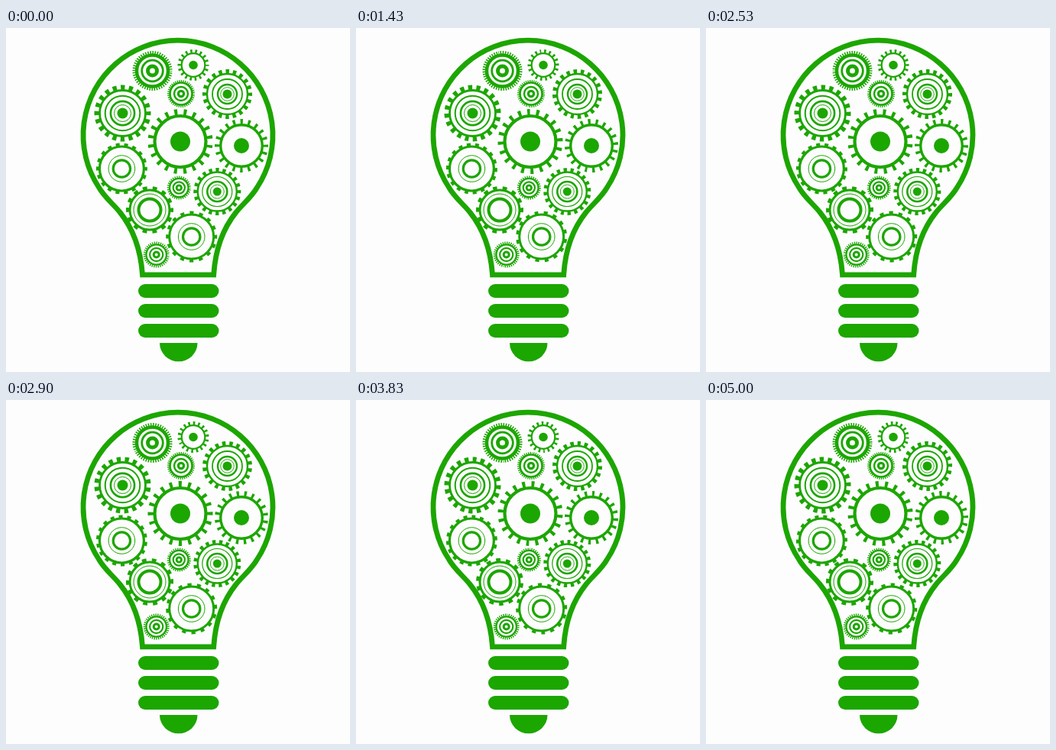
Write an HTML page that moves like this. It is 450 px wide and 450 px high and loops after 5.03 s.

```html
<!DOCTYPE html>
<html lang="en">
<head>
<meta charset="utf-8">
<title>Gears in a light bulb</title>
<style>
  html, body { margin: 0; width: 100%; height: 100%; overflow: hidden; background: #fdfdfd; }
  svg { display: block; width: 100vw; height: 100vh; }
</style>
</head>
<body>
<svg viewBox="0 0 450 450" fill="#1ca600" stroke="none">
  <path d="M178.5 322.8C176.5 294 167.5 264 149 241C140 230 129 221.5 121.5 208.5
           A124 124 0 1 1 328.5 208.5C321 221.5 310 230 301 241C282.5 264 273.5 294 271.7 322.8Z"
        fill="none" stroke="#1ca600" stroke-width="6.8"/>
  <g id="gears"></g>
  <rect x="173" y="335" width="105.5" height="18" rx="9"/>
  <rect x="173" y="361" width="105.5" height="18" rx="9"/>
  <rect x="173" y="387" width="105.5" height="18" rx="9"/>
  <path d="M201 412H250.5A24.75 24.3 0 0 1 201 412Z"/>
</svg>
<script>
const GREEN = '#1ca600';
const LOOP = 5030, STEPS = 151;

// Centre, tooth tip radius, teeth, tooth share of the pitch, direction,
// hub radius, then rings as [radius, width]; the first ring carries the teeth.
const gears = [
  { x: 191.5, y: 56, tip: 26, teeth: 48, share: .5, dir: -1, hub: 0, rings: [[20.5, 4.4], [13.8, 2.8], [6, 5]] },
  { x: 245, y: 48.5, tip: 20.5, teeth: 18, share: .4, dir: -1, hub: 5.8, rings: [[15.3, 2.2]] },
  { x: 229, y: 86, tip: 18, teeth: 40, share: .5, dir: 1, hub: 0, rings: [[14.5, 2.6], [9, 2.4], [3.6, 3.2]] },
  { x: 289.5, y: 86.5, tip: 32.5, teeth: 20, share: .48, dir: 1, hub: 6, rings: [[26.5, 2.4], [19.5, 1.8], [12.5, 2.4], [8.8, .9]] },
  { x: 152.5, y: 111.5, tip: 37, teeth: 20, share: .5, dir: 1, hub: 7, rings: [[30, 2.8], [22.8, 2], [15.6, 2.6], [11, 1]] },
  { x: 228, y: 148.5, tip: 42.5, teeth: 20, share: .33, dir: -1, phase: 9, hub: 13, rings: [[33.5, 4.2]] },
  { x: 308, y: 154, tip: 35, teeth: 20, share: .33, dir: 1, hub: 10, rings: [[27.3, 3.4]] },
  { x: 151.4, y: 184, tip: 33.5, teeth: 18, share: .46, dir: 1, hub: 0, rings: [[29, 3.2], [17.3, 1], [11.2, 3.2]] },
  { x: 188, y: 238, tip: 31, teeth: 14, share: .45, dir: -1, hub: 0, rings: [[26, 3], [21, 1], [14.5, 4]] },
  { x: 242.7, y: 273, tip: 33.5, teeth: 16, share: .42, dir: -1, hub: 0, rings: [[29, 3], [17.3, 1], [11.2, 3.2]] },
  { x: 276.3, y: 214, tip: 31, teeth: 20, share: .48, dir: 1, hub: 5.5, rings: [[25.5, 2.4], [19.5, 1.2], [13, 2.6], [9, .9]] },
  { x: 226.3, y: 209, tip: 15.5, teeth: 32, share: .5, dir: 1, hub: 0, rings: [[12.2, 2.2], [7.6, 2.2], [3.2, 2.8]] },
  { x: 196.7, y: 296.5, tip: 17, teeth: 36, share: .5, dir: 1, hub: 0, rings: [[13.2, 2.2], [8.6, 2.2], [3.5, 3]] }
];

function add(parent, tag, attrs) {
  const el = document.createElementNS('http://www.w3.org/2000/svg', tag);
  for (const key in attrs) el.setAttribute(key, attrs[key]);
  return parent.appendChild(el);
}

function ring(parent, r, width, extra = {}) {
  add(parent, 'circle', { r, fill: 'none', stroke: GREEN, 'stroke-width': width, ...extra });
}

const layer = document.getElementById('gears');
for (const g of gears) {
  const body = add(layer, 'g', { transform: `translate(${g.x} ${g.y})` });
  for (const [r, w] of g.rings) ring(body, r, w);
  if (g.hub) add(body, 'circle', { r: g.hub });

  const root = g.rings[0][0];
  const mid = (root + g.tip) / 2;
  const pitch = 2 * Math.PI * mid / g.teeth;
  g.wheel = add(body, 'g', {});
  ring(g.wheel, mid, g.tip - root, {
    'stroke-dasharray': `${pitch * g.share} ${pitch * (1 - g.share)}`,
    'stroke-dashoffset': pitch * g.share / 2
  });
}

const start = performance.now();
function draw() {
  const t = (performance.now() - start) % LOOP;
  const step = Math.min(STEPS - 1, Math.floor((t + 5) * .03));
  const angle = 360 * step / STEPS;
  for (const g of gears) g.wheel.setAttribute('transform', `rotate(${(g.phase || 0) + g.dir * angle})`);
  requestAnimationFrame(draw);
}
draw();
</script>
</body>
</html>
```
